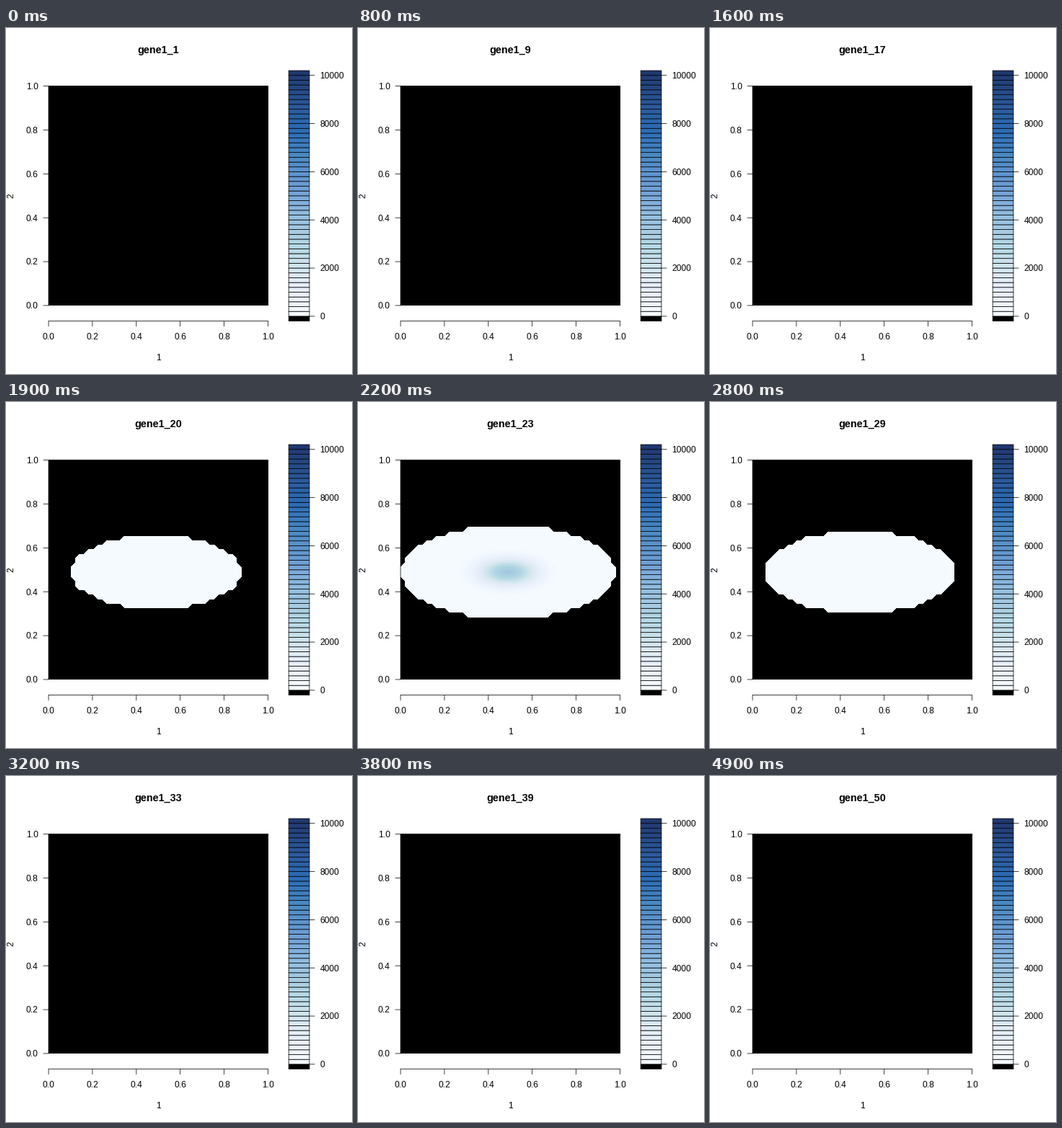
A matplotlib script that plays this animation: 480 px wide and 480 px high, repeating every 5 s.

```python
import numpy as np
import matplotlib.pyplot as plt
from matplotlib.animation import FuncAnimation
from matplotlib.colors import LinearSegmentedColormap
from matplotlib.patches import Rectangle

SIZE, DPI = 480, 72
FRAMES, INTERVAL = 50, 100
N, CENTER = 50, 24
LINE = 14.4  # height of one margin line in pixels

LEFT, RIGHT = 59.04, 363.36
TOP, BOTTOM = 80.64, 384.96
AXIS_Y = 406.56
KEY_LEFT, KEY_RIGHT, KEY_TOP = 392.16, 420.96, 59.04
MID_X, MID_Y = (LEFT + RIGHT) / 2, (TOP + BOTTOM) / 2

STEP = 200
LEVELS = np.arange(0, 10200 + STEP, STEP)
STOPS = [(0, "#f4fafe"), (0.08, "#eaf0fb"), (0.14, "#e0ebf5"),
         (0.20, "#cfe5ec"), (0.26, "#b9dae6"), (0.35, "#a5cbe2"),
         (0.45, "#85b2dd"), (0.55, "#6698d2"), (0.65, "#4c8ac4"),
         (0.76, "#2c6cb5"), (0.86, "#2b5a9e"), (1, "#20376f")]
PALETTE = LinearSegmentedColormap.from_list("blues", STOPS)
COLORS = [PALETTE(v) for v in np.linspace(0, 1, len(LEVELS) - 1)]

plt.rcParams["font.family"] = "Liberation Sans"
fig = plt.figure(figsize=(SIZE / DPI, SIZE / DPI), dpi=DPI, facecolor="white")
ax = fig.add_axes([0, 0, 1, 1])
ax.set_xlim(0, SIZE)
ax.set_ylim(SIZE, 0)
ax.axis("off")


def line(x0, y0, x1, y1):
    ax.plot([x0, x1], [y0, y1], color="black", lw=0.75, snap=False,
            solid_capstyle="round", zorder=4)


def label(x, y, text, ha="center", size=12, **style):
    return ax.text(x, y, text, ha=ha, va="baseline", fontsize=size, **style)


def key_y(value):
    return AXIS_Y - (value + STEP) * (AXIS_Y - KEY_TOP) / (10200 + STEP)


def draw_axes():
    line(LEFT, AXIS_Y, RIGHT, AXIS_Y)
    line(LEFT, TOP, LEFT, BOTTOM)
    for t in np.linspace(0, 1, 6):
        x = LEFT + t * (RIGHT - LEFT)
        y = BOTTOM - t * (BOTTOM - TOP)
        line(x, AXIS_Y, x, AXIS_Y + LINE / 2)
        line(LEFT - LINE / 2, y, LEFT, y)
        label(x, AXIS_Y + 1.8 * LINE, f"{t:.1f}")
        label(LEFT - LINE, y + 4.3, f"{t:.1f}", ha="right")
    label(MID_X, AXIS_Y + 3.8 * LINE, "1")
    label(LEFT - 3.2 * LINE, MID_Y, "2", ha="right", rotation=90).set_va("center")


def draw_key():
    for low, color in zip([-STEP, *LEVELS], ["black", *COLORS]):
        y0, y1 = key_y(low), key_y(low + STEP)
        ax.add_patch(Rectangle((KEY_LEFT, y1), KEY_RIGHT - KEY_LEFT, y0 - y1,
                               facecolor=color, edgecolor="black", lw=0.75,
                               snap=False, zorder=3))
    for value in range(0, 10001, 2000):
        y = key_y(value)
        line(KEY_RIGHT, y, KEY_RIGHT + LINE / 2, y)
        label(KEY_RIGHT + LINE, y + 4.3, str(value), ha="left")


draw_axes()
draw_key()
ax.add_patch(Rectangle((LEFT, TOP), RIGHT - LEFT, BOTTOM - TOP, facecolor="black",
                       lw=0, antialiased=False, snap=False, zorder=1))
title = label(MID_X, 34.8, "", size=14.4, weight="bold")

grid_x = np.linspace(LEFT, RIGHT, N)
grid_y = np.linspace(BOTTOM, TOP, N)
offset = np.arange(N) - CENTER
dx, dy = np.meshgrid(offset, offset)
contours = []


def draw_slice(depth):
    """Gaussian concentration inside one slice of an ellipsoid."""
    q = dx**2 + 5 * dy**2 + 10 * depth**2
    inside = q <= 625
    if not inside.any():
        return
    z = np.where(inside, 10000 * np.exp(-q / 40), -STEP)
    contours.append(ax.contourf(grid_x, grid_y, z, levels=LEVELS, colors=COLORS,
                                antialiased=False, zorder=2))


def update(i):
    while contours:
        contours.pop().remove()
    draw_slice(i - CENTER)
    title.set_text(f"gene1_{i + 1}")
    return []


anim = FuncAnimation(fig, update, frames=FRAMES, interval=INTERVAL,
                     repeat=True, repeat_delay=0, blit=False)
plt.show()
```
